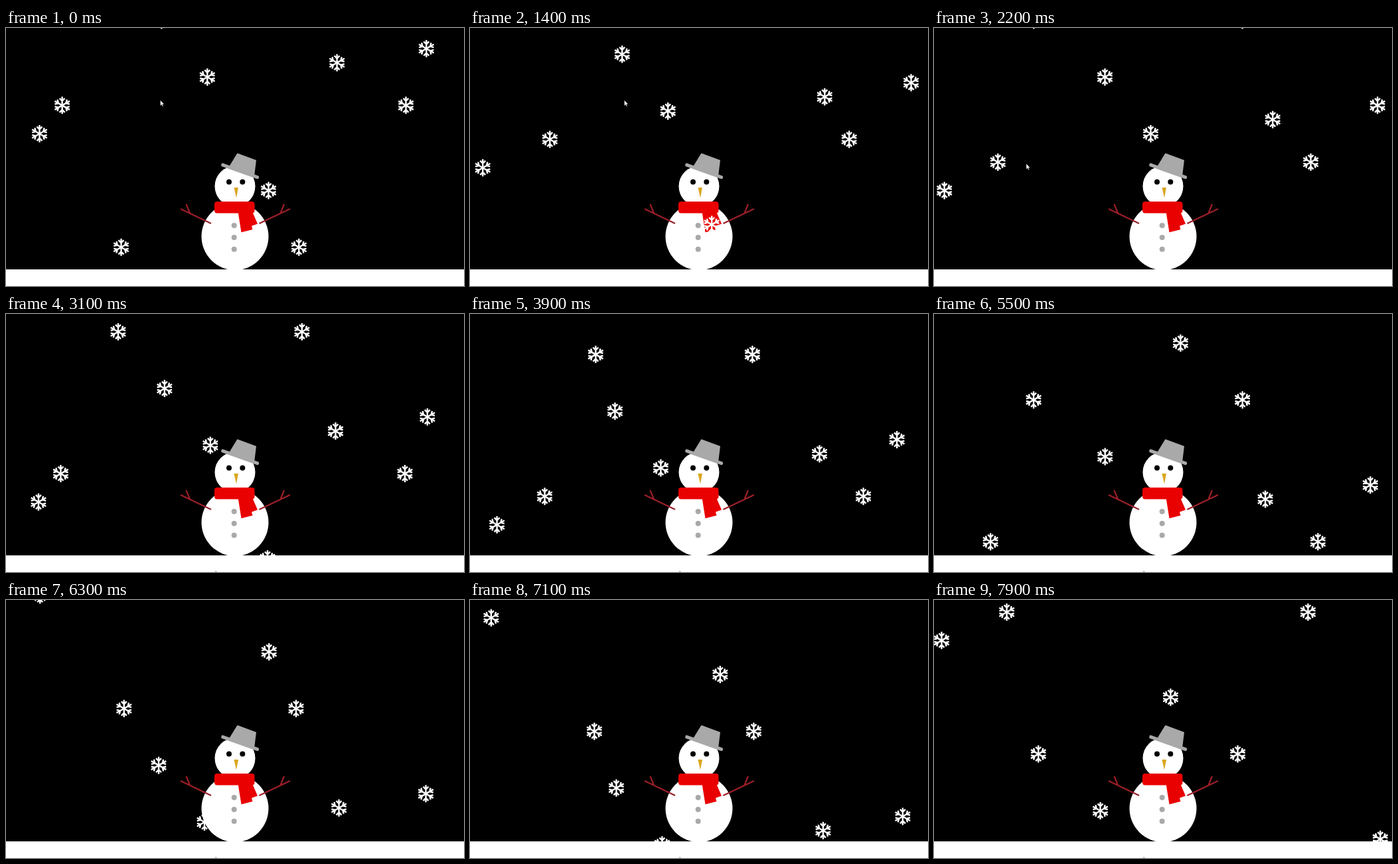
Animation of 690x388 px, one loop 8000 ms. Source, as an HTML page:

```html
<!DOCTYPE html>
<html lang="en">
<head>
<meta charset="utf-8">
<title>Snowman</title>
<style>
  html, body { margin: 0; width: 100%; height: 100%; overflow: hidden; background: #000; }
  svg { display: block; width: 100%; height: 100%; }
</style>
</head>
<body>
<svg viewBox="0 0 690 388">
  <defs>
    <path id="spoke" d="M0 0V-13M-4-10.6L0-6.6L4-10.6" fill="none" stroke="#fff" stroke-width="2.4"/>
    <g id="flake"></g>
  </defs>
  <rect width="690" height="388" fill="#000"/>
  <rect y="363" width="690" height="25" fill="#fff"/>

  <g fill="#fff">
    <circle cx="345" cy="313.5" r="50.5"/>
    <circle cx="345" cy="238" r="30.5"/>
  </g>
  <circle cx="336" cy="231.6" r="4"/>
  <circle cx="356.3" cy="231.6" r="4"/>
  <path d="M343.4 240H350L347 255.5Z" fill="#daa520"/>
  <g fill="#a9a9a9">
    <circle cx="343.7" cy="297" r="4"/>
    <circle cx="343.7" cy="315" r="4"/>
    <circle cx="343.7" cy="332.8" r="4"/>
    <path d="M348.5 188.3L377 198.7L374 223L336 208.5Z"/>
    <rect x="-30" y="-2.5" width="60" height="5" rx="2" transform="translate(352.7 215.2) rotate(19.5)"/>
  </g>
  <g fill="#e90000">
    <path d="M349.5 276L354.5 307.2L371.5 303L370 297.8L379 294.6L371 276Z"/>
    <rect x="314" y="261" width="60.5" height="17.5" rx="4"/>
  </g>
  <path d="M309 294L263 272M277 278.5L271.5 265M381.5 294L428 272M413.5 278.5L419 265"
        fill="none" stroke="#9c1f28" stroke-width="2.2"/>

  <g id="flakes"></g>
  <path id="cursor" d="M0 0V8.4L2 6.7L3.3 9.6L4.6 9L3.3 6.2H5.8Z" fill="#fff" stroke="#222" stroke-width=".5"/>
</svg>
<script>
  const LOOP = 8000, STEP = 100, WIDTH = 690, HEIGHT = 388;
  const FALL = 10, SHAKE = 3, SWAY = 40;

  // left edge (share of width), fall delay, shake delay (s)
  const specs = [
    [0, 0, 0], [.1, 1, 1], [.2, 6, .5], [.3, 4, 2], [.4, 2, 2],
    [.5, 8, 3], [.6, 6, 2], [.7, 2.5, 1], [.8, 1, 0], [.9, 3, 1.5]
  ];

  // time (ms), x, y of the pointer tip
  const pointerPath = [
    [1500, 232.5, 108.5], [2100, 139, 204], [2300, 139, 204], [3000, 316, 386.6]
  ];

  const byId = id => document.getElementById(id);
  const mod = (a, n) => ((a % n) + n) % n;

  function addUse(parent, href) {
    const use = document.createElementNS("http://www.w3.org/2000/svg", "use");
    use.setAttribute("href", href);
    return parent.appendChild(use);
  }

  function move(node, x, y) {
    node.setAttribute("transform", `translate(${x.toFixed(2)} ${y.toFixed(2)})`);
  }

  // cubic-bezier(.42, 0, .58, 1)
  function easeInOut(x) {
    let low = 0, high = 1, u = .5;
    for (let i = 0; i < 20; i++) {
      u = (low + high) / 2;
      const v = 1 - u;
      if (1.26 * u * v * v + 1.74 * u * u * v + u ** 3 < x) low = u; else high = u;
    }
    return u * u * (3 - 2 * u);
  }

  function pointerAt(ms) {
    const next = pointerPath.findIndex(p => p[0] > ms);
    if (next === 0) return pointerPath[0].slice(1);
    if (next < 0) return pointerPath.at(-1).slice(1);
    const [t0, x0, y0] = pointerPath[next - 1], [t1, x1, y1] = pointerPath[next];
    const k = (ms - t0) / (t1 - t0);
    return [x0 + (x1 - x0) * k, y0 + (y1 - y0) * k];
  }

  for (let angle = 0; angle < 360; angle += 60)
    addUse(byId("flake"), "#spoke").setAttribute("transform", `rotate(${angle})`);
  const flakes = specs.map(() => addUse(byId("flakes"), "#flake"));

  function draw(ms) {
    // the snow runs a little slower during the first 0.9 s
    const clock = 4.34 + (ms < 900 ? ms * 7 / 9 : ms - 200) / 1000;
    specs.forEach(([left, fallDelay, shakeDelay], i) => {
      const fall = mod(clock - fallDelay, FALL) / FALL;
      const phase = mod(clock - shakeDelay, SHAKE) / SHAKE * 2;
      const sway = phase < 1 ? easeInOut(phase) : 1 - easeInOut(phase - 1);
      move(flakes[i], left * WIDTH + 11.4 + SWAY * sway, HEIGHT * (1.1 * fall - .1) + 12.6);
    });
    move(byId("cursor"), ...pointerAt(ms));
  }

  const start = performance.now();
  function tick() {
    const elapsed = performance.now() - start + 20;
    draw(Math.floor(elapsed % LOOP / STEP) * STEP);
    requestAnimationFrame(tick);
  }
  tick();
</script>
</body>
</html>
```
